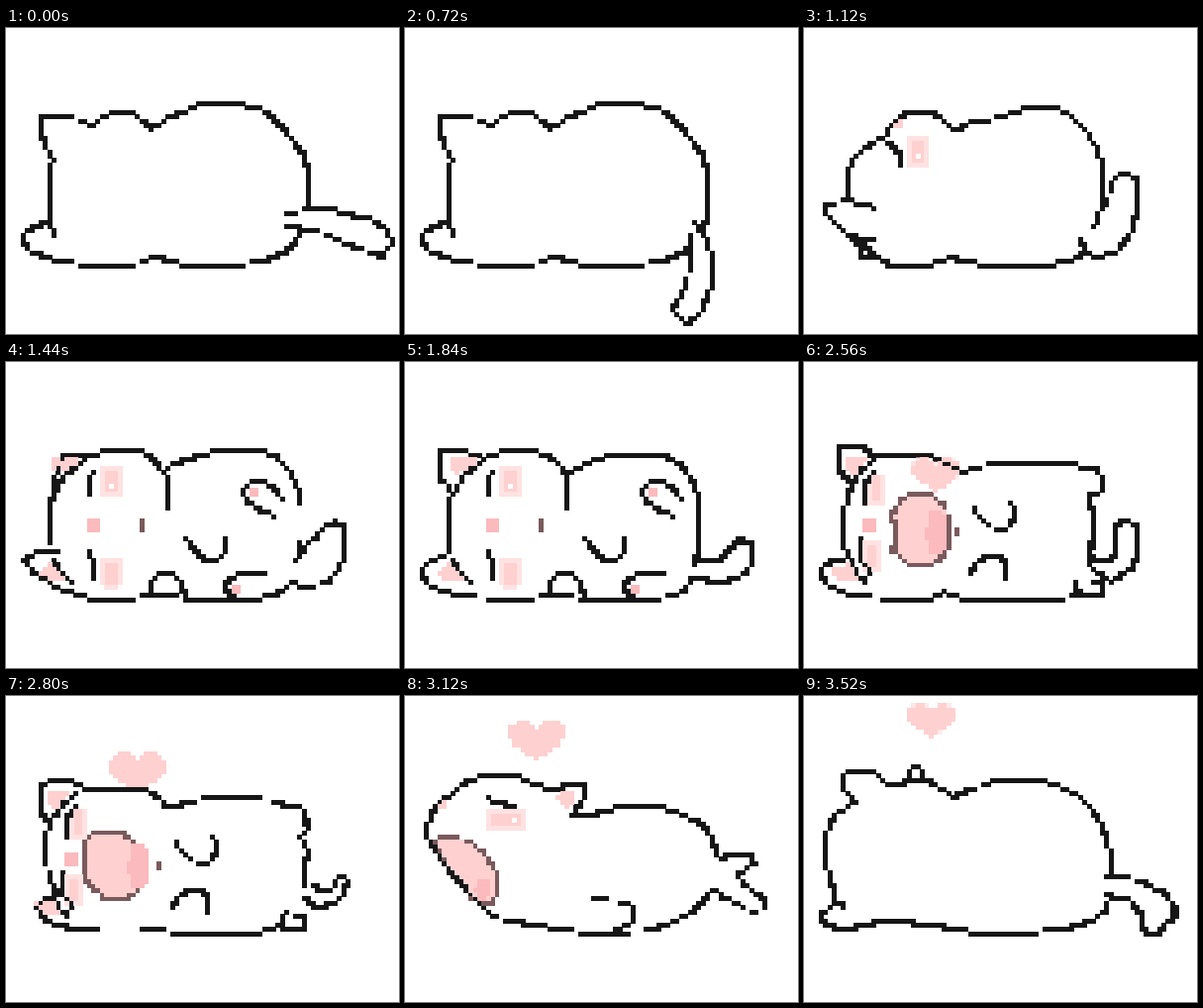
Write an HTML page without scripts that moves like this. It is 397 px wide and 309 px high and loops after 3.6 s.

```html
<!DOCTYPE html>
<html lang="en">
<head>
<meta charset="utf-8">
<title>Rolling cat</title>
<style>
html, body { margin: 0; width: 100%; height: 100%; overflow: hidden; background: #fff; }
svg { display: block; width: 397px; height: 309px; shape-rendering: crispEdges; }
path, line { fill: none; stroke: #161616; stroke-width: 4.4; }
.pale { fill: #ffe2e2; stroke: none; }
.pink { fill: #ffd0d0; stroke: none; }
.rose { fill: #fbbabd; stroke: none; }
.grid line { stroke: #fff; stroke-dasharray: 1 3.435; }

.top, .base, .rump, .tail, .mouth, .heart { animation: 3.6s infinite; }
.top { animation-name: top; }
.base { animation-name: base; }
.rump { animation-name: rump; }
.tail { animation-name: tail; }
.mouth { animation-name: mouth, yawning; animation-timing-function: linear, step-end; fill: #ffd0d0; stroke: #7a5a5c; }
.heart { animation-name: heart; }
.pose { visibility: hidden; animation: 3.6s step-end infinite; }
.turning { animation-name: turning; }
.facing { animation-name: facing; }
.yawn { animation-name: yawn; }
.away { animation-name: away; }
.back { animation-name: back; }

@keyframes turning { 0% { visibility: hidden } 28.889% { visibility: visible } 37.778% { visibility: hidden } }
@keyframes facing { 0% { visibility: hidden } 37.778% { visibility: visible } 64.444% { visibility: hidden } }
@keyframes yawn { 0% { visibility: hidden } 64.444% { visibility: visible } 80% { visibility: hidden } }
@keyframes away { 0% { visibility: hidden } 80% { visibility: visible } 93.333% { visibility: hidden } }
@keyframes back { 0% { visibility: hidden } 93.333% { visibility: visible } }
@keyframes yawning { 0% { visibility: hidden } 64.444% { visibility: visible } 93.333% { visibility: hidden } }

/* Left side, ear, head, neck and back */
@keyframes top {
  0%, 22.222%, 100% { animation-timing-function: steps(4); d: path("M52 213L47 205 44 196 44 143 48 134 42 122 35 107 35 92 39 89 58 89 74 93 86 99 95 93 106 85 126 85 138 93 147 102 163 92 178 85 190 79 200 76 226 76 250 80 263 85 282 103 300 127") }
  31.111% { animation-timing-function: steps(7); d: path("M44 175L44 160 44 148 50 132 62 121 70 116 80 112 83 108 84 104 88 99 93 95 98 90 106 85 118 85 130 85 142 94 153 105 164 97 178 94 196 91 212 85 228 80 252 80 268 88 286 105 296 122") }
  46.667%, 60% { animation-timing-function: steps(5); d: path("M44 196L44 170 44 143 48 134 42 125 35 117 35 104 35 92 40 89 58 90 80 97 90 93 106 90 130 90 148 97 160 108 164 118 170 110 185 102 195 98 208 95 235 95 262 95 278 103 290 120 296 136") }
  71.111%, 75.556% { animation-timing-function: steps(5); d: path("M46 198L40 184 40 155 44 138 49 123 38 113 35 102 35 88 39 85 60 86 71 97 84 94 100 94 125 94 135 98 148 104 160 112 172 108 185 104 195 102 208 102 240 102 268 102 280 107 297 108 301 116") }
  86.667% { animation-timing-function: steps(5); d: path("M80 215L60 193 40 170 29 152 22 143 22 130 33 108 45 102 60 88 78 80 110 80 138 92 158 94 160 89 180 89 182 102 168 121 190 120 205 115 225 111 240 111 256 111 275 118 295 126 308 138 312 150") }
  97.778% { animation-timing-function: step-end; d: path("M43 213L33 210 30 195 23 175 23 140 30 122 50 106 41 94 40 79 45 76 70 76 88 92 96 89 106 86 126 86 138 93 150 102 165 96 180 91 192 86 215 86 240 86 262 93 280 102 292 115 302 135") }
}
/* Lower ear and belly */
@keyframes base {
  0%, 22.222%, 100% { animation-timing-function: steps(4); d: path("M44 196L30 200 17 208 17 216 27 227 40 231 52 235 77 239 130 239 149 231 180 239 236 239 263 235 281 227") }
  31.111% { animation-timing-function: steps(7); d: path("M72 183L66 179 45 175 22 178 22 186 35 201 60 222 86 239 130 239 146 232 181 239 250 239 270 235 284 227") }
  46.667%, 60% { animation-timing-function: steps(5); d: path("M44 196L28 200 17 208 17 216 27 228 40 232 52 235 86 239 130 239 142 235 185 239 258 239 275 235 288 227") }
  71.111%, 75.556% { animation-timing-function: steps(5); d: path("M48 197L28 202 17 210 18 218 28 228 40 233 52 236 84 239 130 239 141 232 158 239 262 239 272 236 276 231") }
  86.667% { animation-timing-function: steps(5); d: path("M80 215L84 218 88 221 93 223 100 226 112 229 125 230 140 233 155 235 180 239 205 239 240 238 265 231 288 220") }
  97.778% { animation-timing-function: step-end; d: path("M44 213L33 209 18 219 18 228 35 235 45 235 55 233 77 228 100 228 140 233 172 239 232 239 264 235 290 228") }
}
@keyframes rump {
  0%, 100% { animation-timing-function: steps(9); d: path("M300 127L306 148 306 160 306 172 306 183M281 227L291 218 298 203") }
  20%, 22.222% { animation-timing-function: steps(4); d: path("M300 127L306 148 306 160 306 181 302 205M281 227L284 225 288 221") }
  31.111% { animation-timing-function: steps(7); d: path("M296 122L302 142 302 160 302 178 293 202M284 227L283 222 279 212") }
  46.667%, 60% { animation-timing-function: steps(5); d: path("M296 136L297 150 297 170 297 182 293 205M288 227L289 223 290 218") }
  71.111%, 75.556% { animation-timing-function: steps(5); d: path("M301 116L301 130 286 137 293 152 289 205M276 231L276 227 276 222") }
  86.667% { animation-timing-function: steps(5); d: path("M312 150L317 163 348 160 352 169 335 182M288 220L300 208 312 193") }
  97.778% { animation-timing-function: step-end; d: path("M302 135L309 155 311 165 311 174 311 183M290 228L305 217 311 200") }
}
@keyframes tail {
  0%, 100% { animation-timing-function: steps(2); d: path("M283 187L304 184 330 184 352 190 369 194 384 203 391 216 380 231 350 220 315 205 283 200") }
  4.444% { animation-timing-function: steps(4); d: path("M283 187L304 184 330 186 354 195 372 202 389 213 395 227 384 241 352 227 315 206 283 200") }
  13.333% { animation-timing-function: steps(3); d: path("M288 190L302 192 318 198 336 212 350 232 356 252 347 267 330 262 312 240 298 220 286 204") }
  20% { animation-timing-function: steps(3); d: path("M292 195L300 206 306 216 310 236 310 260 297 290 284 299 270 286 284 260 288 240 289 208") }
  26.667% { animation-timing-function: steps(2); d: path("M300 190L308 196 320 202 335 206 350 212 360 222 355 236 340 240 318 236 300 228 285 214") }
  31.111% { animation-timing-function: steps(9); d: path("M306 180L308 170 310 160 314 150 325 147 337 154 337 180 332 202 318 225 295 232 282 226") }
  51.111% { animation-timing-function: steps(9); d: path("M292 205L298 200 318 200 328 190 338 179 350 184 351 196 346 212 335 219 315 223 292 217") }
  71.111% { animation-timing-function: steps(7); d: path("M289 197L300 202 312 199 316 182 314 165 325 160 337 166 338 188 332 208 310 222 290 208") }
  86.667% { animation-timing-function: steps(5); d: path("M335 182L340 187 346 193 354 200 364 204 364 214 355 218 345 216 335 210 322 204 312 195") }
  97.778% { animation-timing-function: step-end; d: path("M302 183L330 184 346 190 362 198 372 208 370 224 358 240 344 240 342 222 330 207 302 200") }
}
@keyframes mouth {
  0%, 64.444% { animation-timing-function: steps(3); d: path("M128 160L130 157 133 155 137 155 141 157 143 160 143 168 141 172 137 174 133 174 129 170 130 165Z") }
  71.111%, 75.556% { animation-timing-function: steps(5); d: path("M89 155L96 141 108 135 128 135 140 143 147 158 148 180 141 196 127 205 108 205 90 190 93 171Z") }
  86.667% { animation-timing-function: steps(3); d: path("M32 145L38 142 52 143 68 149 82 161 92 178 93 198 87 208 74 210 62 196 45 176 34 158Z") }
  93.333%, 100% { d: path("M24 160L25 158 27 158 29 160 30 164 31 168 31 172 30 176 28 178 26 174 24 170 23 165Z") }
}
@keyframes heart {
  0%, 66.667%, 100% { transform: translate(136px, 145px) scale(0); animation-timing-function: steps(2) }
  71.111% { transform: translate(133px, 114px) scale(.85); animation-timing-function: steps(3) }
  77.778% { transform: translate(133px, 77px); animation-timing-function: steps(4) }
  86.667% { transform: translate(133px, 45px); animation-timing-function: steps(4) }
  95.556% { transform: translate(130px, 21px) scale(.9); animation-timing-function: step-end }
  97.778% { transform: translate(128.5px, 24.5px) scale(.85); animation-timing-function: step-end }
}
</style>
</head>
<body>
<svg viewBox="0 0 397 309">
  <defs>
    <!-- Sample one dot per cell, then grow each dot into a square pixel -->
    <mask id="columns" class="grid" maskUnits="userSpaceOnUse" x="0" y="0" width="397" height="309">
      <line x1="3.7" y1="154.5" x2="398" y2="154.5" style="stroke-width:309"/>
    </mask>
    <mask id="rows" class="grid" maskUnits="userSpaceOnUse" x="0" y="0" width="397" height="309">
      <line x1="198.5" y1=".37" x2="198.5" y2="310" style="stroke-width:397"/>
    </mask>
    <filter id="pixels" filterUnits="userSpaceOnUse" x="0" y="0" width="397" height="309" color-interpolation-filters="sRGB">
      <feMorphology operator="dilate" radius="2"/>
    </filter>
    <g id="blush">
      <rect class="pale" x="-11" y="-15" width="22" height="30" rx="5"/>
      <rect class="pink" x="-7" y="-11" width="14" height="22" rx="3"/>
      <rect x="-2" y="1" width="4.4" height="4.4" fill="#fff"/>
    </g>
  </defs>

  <g filter="url(#pixels)"><g mask="url(#columns)"><g mask="url(#rows)">
    <path class="heart pink" d="M0 20L-10 14-24 4-29-4-27-14-18-20-8-19 0-13 8-19 18-20 27-14 29-4 24 4 10 14Z"/>

    <g class="pose yawn">
      <rect class="pale" x="66" y="112" width="15" height="32"/>
      <rect class="pink" x="68" y="116" width="9" height="24"/>
      <rect class="pale" x="60" y="180" width="16" height="32"/>
      <rect class="pink" x="63" y="184" width="10" height="24"/>
      <rect class="rose" x="60" y="158" width="12" height="13"/>
    </g>

    <path class="mouth"/>

    <g class="pose turning">
      <use href="#blush" x="115" y="125"/>
      <rect class="pink" x="91" y="91" width="9" height="10"/>
      <path d="M85 116L97 128 97 139M52 210L60 213 72 214M57 220L57 230 76 233M60 216L74 231"/>
    </g>

    <g class="pose facing">
      <path class="pink" d="M44 96L75 97 68 108 50 113Z"/>
      <path class="pink" d="M33 212L46 202 58 219 36 219Z"/>
      <use href="#blush" x="106" y="121"/>
      <use href="#blush" x="106" y="213"/>
      <rect class="rose" x="82" y="158" width="12" height="13"/>
      <rect x="135" y="158" width="4.4" height="13" fill="#7a5a5c"/>
      <rect class="rose" x="246" y="127" width="9" height="9"/>
      <rect class="rose" x="228" y="225" width="9" height="9"/>
      <path d="M48 136L58 116 80 98M46 198L55 212 68 224M88 109L84 122 84 135M84 189L88 204 88 221M164 116L164 149"/>
      <path d="M182 177L190 190 200 200 212 200 221 194 221 177M148 236L147 222 156 214 170 214 178 225 181 237"/>
      <path d="M281 139L272 129 262 121 245 123 239 132 245 143 258 150 272 156M264 213L238 214 224 219 222 230 230 237"/>
    </g>

    <g class="pose yawn">
      <path class="pink" d="M41 96L64 96 51 115 43 110Z"/>
      <path class="pink" d="M28 210L45 204 56 220 35 220Z"/>
      <ellipse class="rose" cx="134" cy="172" rx="11" ry="24"/>
      <rect x="153" y="167" width="4.4" height="9" fill="#7a5a5c"/>
      <path d="M49 123L58 110 72 97M46 198L53 212 63 223M71 110L63 122 62 145M58 178L58 200 69 216"/>
      <path d="M172 146L178 158 190 167 203 168 212 160 212 147 206 141M168 215L175 202 186 196 200 197 204 208 203 222M276 231L284 237 300 236 302 222 291 221"/>
    </g>

    <g class="pose away">
      <path class="pink" d="M149 99L173 97 168 111 160 112Z"/>
      <rect class="pale" x="82" y="113" width="40" height="23"/>
      <rect class="pink" x="87" y="117" width="30" height="15"/>
      <rect x="109" y="122" width="4.4" height="4.4" fill="#fff"/>
      <rect class="pink" x="33" y="106" width="9" height="9"/>
      <ellipse class="rose" cx="79" cy="195" rx="9" ry="11"/>
      <path d="M82 101L92 108 113 111M189 205L222 208 231 214 231 228 215 236 205 239"/>
    </g>

    <g class="pose back">
      <path d="M106 84L107 74 113 70 120 76 120 85M45 102L54 107M372 206L377 219 368 231"/>
    </g>

    <path class="top"/>
    <path class="base"/>
    <path class="rump"/>
    <path class="tail"/>
  </g></g></g>
</svg>
</body>
</html>
```
